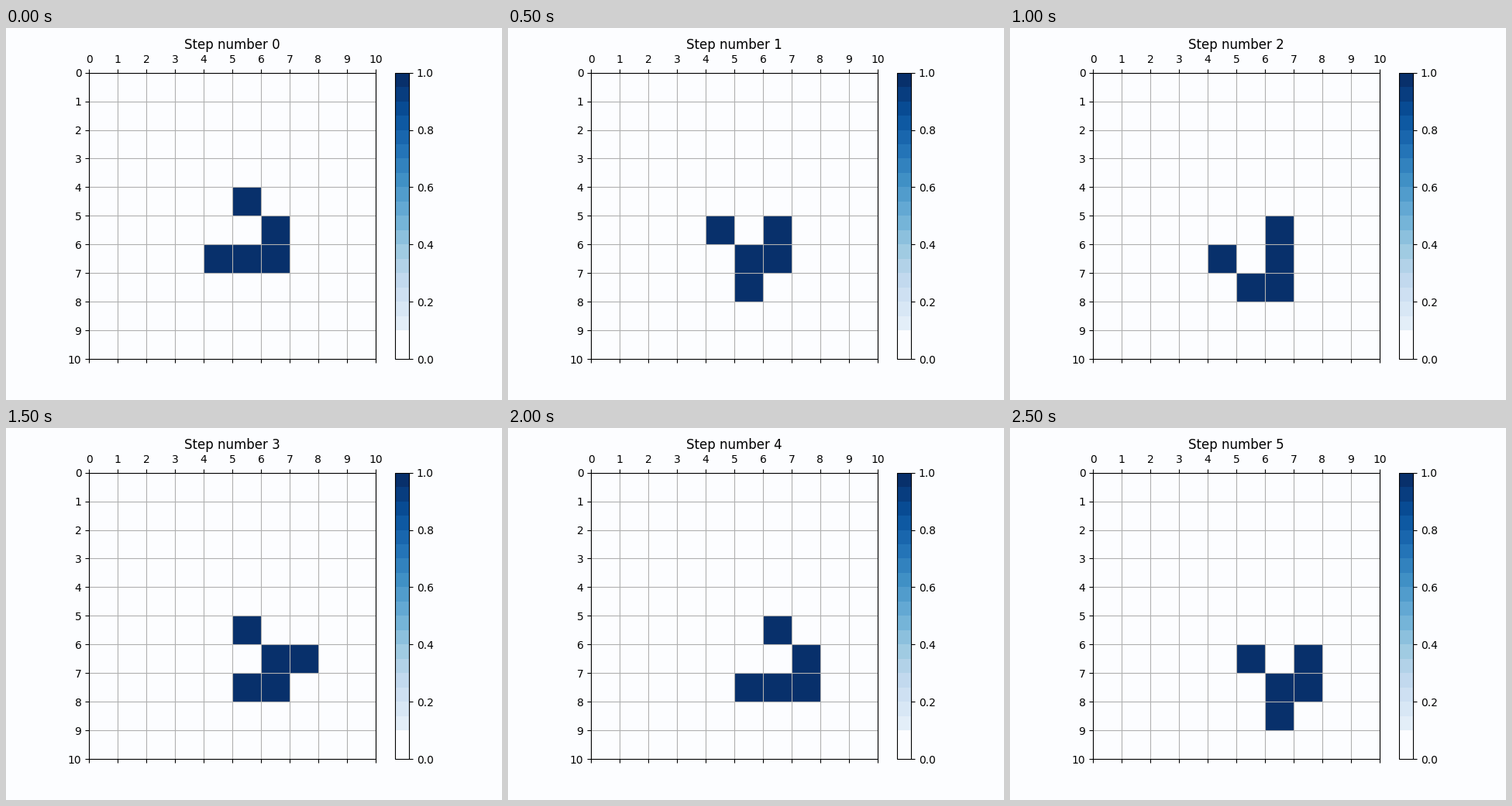
Write a matplotlib script that moves like this. It is 640x480 px and loops after 3 s.

```python
import numpy as np
import matplotlib.pyplot as plt
from matplotlib.animation import FuncAnimation
from matplotlib.colors import ListedColormap, to_rgba

SIZE = 10
STEPS = 6
BANDS = 20
PAPER = "#fcfdff"
GLIDER = [(4, 5), (5, 6), (6, 4), (6, 5), (6, 6)]

plt.rcParams["font.family"] = "DejaVu Sans"


def banded_blues():
    """Blues in even steps, starting from the paper colour."""
    tones = plt.get_cmap("Blues")(np.linspace(0, 1, BANDS))
    tones[:2] = to_rgba(PAPER)
    return ListedColormap(tones)


def evolve(grid):
    """One Game of Life step; the count includes the cell itself."""
    shifts = (-1, 0, 1)
    block = sum(np.roll(grid, (r, c), axis=(0, 1)) for r in shifts for c in shifts)
    return ((block == 3) | ((block == 4) & (grid == 1))).astype(int)


def history():
    grid = np.zeros((SIZE, SIZE), int)
    for cell in GLIDER:
        grid[cell] = 1
    grids = [grid]
    while len(grids) < STEPS:
        grids.append(evolve(grids[-1]))
    return grids


grids = history()
fig, ax = plt.subplots(figsize=(6.4, 4.8), dpi=100, facecolor=PAPER)
image = ax.matshow(grids[0], cmap=banded_blues(), vmin=0, vmax=1,
                   extent=(0, SIZE, SIZE, 0))
ax.set_xticks(range(SIZE + 1))
ax.set_yticks(range(SIZE + 1))
ax.grid(True)
fig.colorbar(image)
title = ax.set_title("Step number 0", pad=5.3)


def update(step):
    image.set_data(grids[step])
    title.set_text(f"Step number {step}")
    return image, title


anim = FuncAnimation(fig, update, frames=STEPS, interval=500,
                     repeat=True, repeat_delay=0)
plt.show()
```
